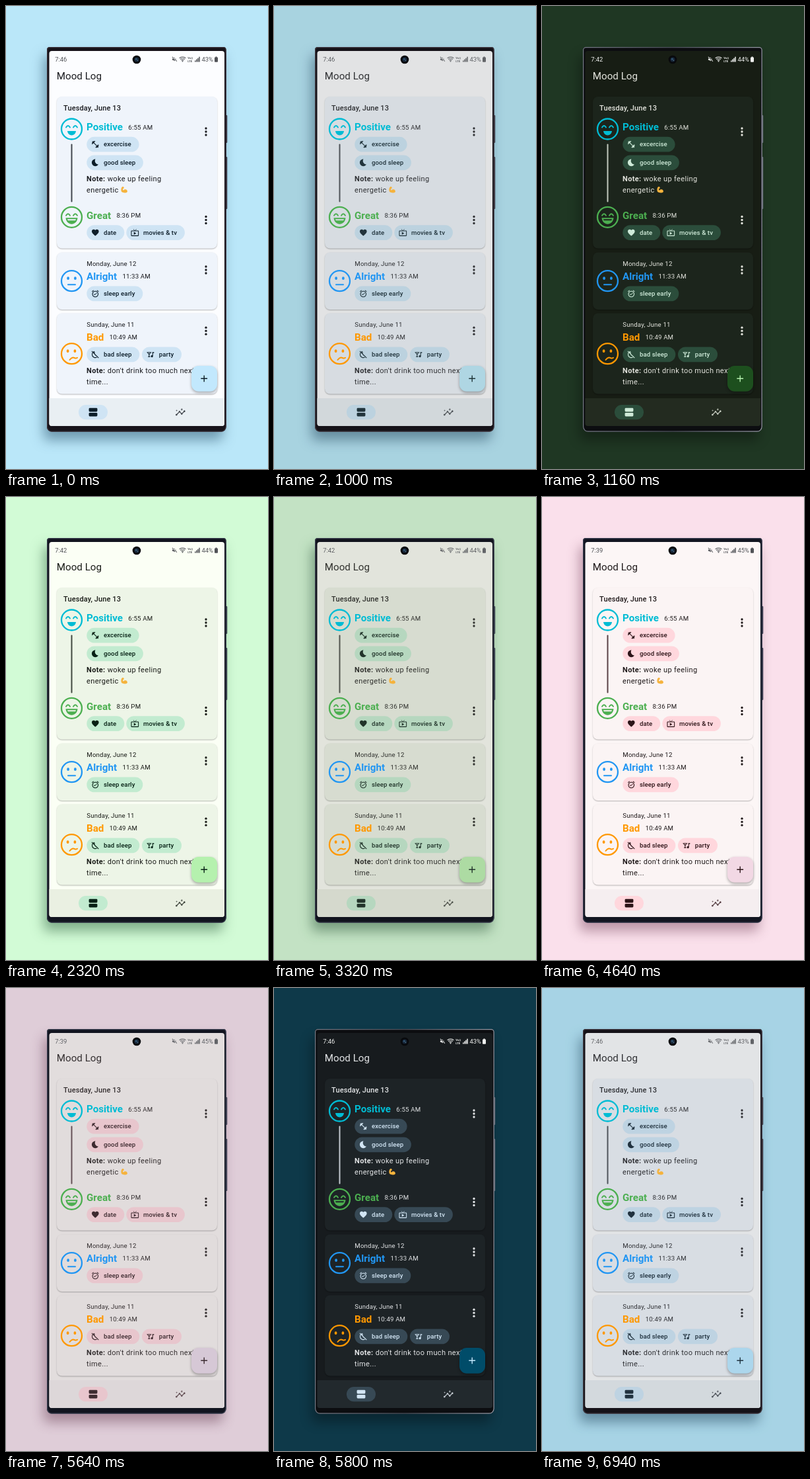
An HTML page with a canvas for the animation above (6.96 s loop, 397x700 px).

```html
<!DOCTYPE html>
<html lang="en">
<head>
<meta charset="utf-8">
<title>Mood Log themes</title>
<style>
html, body { margin: 0; width: 100%; height: 100%; overflow: hidden; }
canvas { display: block; width: 397px; height: 700px; }
</style>
</head>
<body>
<canvas id="stage"></canvas>
<script>
const W = 397, H = 700;
const HOLD = 1000, STEP = 20, STEPS = 9, SEGMENT = 1160;
const DP = 0.69; // pixels per layout unit of the phone screen
const dpr = window.devicePixelRatio || 1;

const themes = [
  { bg: '#bae7f9', screen: '#fcfdff', card: '#eff4fb', chip: '#cfe4f4', nav: '#e9eff3', fab: '#c2e8fd',
    text: '#1b1c20', ink: '#0c1d29', line: '#42474e', shade: 'rgba(40,80,105,.5)', body: '#17131a', edge: '#3b3038', time: '7:46', power: 43 },
  { dark: true, bg: '#1f3723', screen: '#171d14', card: '#1c251c', chip: '#2b4d3b', nav: '#232b20', fab: '#1d4f1e',
    text: '#e2e3dc', ink: '#ceead8', line: '#c2c9bd', fabInk: '#b5f1ae', time: '7:42', power: 44 },
  { bg: '#d2fbd6', screen: '#fbfff5', card: '#edf5e7', chip: '#c2ebd0', nav: '#eaf0e2', fab: '#b5f1ae',
    text: '#1a1c18', ink: '#062014', line: '#424940', shade: 'rgba(50,100,65,.5)', body: '#12141f', edge: '#343849', time: '7:42', power: 44 },
  { dark: true, bg: '#4f2638', screen: '#23181b', card: '#2b1f22', chip: '#5d3c41', nav: '#33262a', fab: '#73304f',
    text: '#ecdfe1', ink: '#ffd9df', line: '#d5c2c6', fabInk: '#ffd8e6', time: '7:39', power: 45 },
  { bg: '#fae0eb', screen: '#fcf6f6', card: '#fbf4f4', chip: '#ffd7dd', nav: '#f5eef0', fab: '#f2d8e4',
    text: '#201a1b', ink: '#2c1418', line: '#5a4247', shade: 'rgba(110,60,85,.45)', body: '#121521', edge: '#343a4c', time: '7:39', power: 45 },
  { dark: true, bg: '#0e3949', screen: '#171b1e', card: '#1d2326', chip: '#374955', nav: '#22292d', fab: '#004c69',
    text: '#e1e3e5', ink: '#d2e5f4', line: '#c1c7ce', fabInk: '#c2e8fd', time: '7:46', power: 43 }
];

// Icon outlines on a 24 unit grid
const icons = {
  dumbbell: 'M20.57 14.86L22 13.43 20.57 12 17 15.57 8.43 7 12 3.43 10.57 2 9.14 3.43 7.71 2 5.57 4.14 4.14 2.71 2.71 4.14l1.43 1.43L2 7.71l1.43 1.43L2 10.57 3.43 12 7 8.43 15.57 17 12 20.57 13.43 22l1.43-1.43L16.29 22l2.14-2.14 1.43 1.43 1.43-1.43-1.43-1.43L22 16.29z',
  moon: 'M12.34 2.02C6.59 1.82 2 6.42 2 12c0 5.52 4.48 10 10 10 3.71 0 6.93-2.02 8.66-5.02-7.51-.25-12.09-8.43-8.32-14.96z',
  heart: 'M12 21.35l-1.45-1.32C5.4 15.36 2 12.28 2 8.5 2 5.42 4.42 3 7.5 3c1.74 0 3.41.81 4.5 2.09C13.09 3.81 14.76 3 16.5 3 19.58 3 22 5.42 22 8.5c0 3.78-3.4 6.86-8.55 11.54z',
  tv: 'M21 6h-7.59l3.29-3.29L16 2l-4 4-4-4-.71.71L10.59 6H3c-1.1 0-2 .89-2 2v12c0 1.1.9 2 2 2h18c1.1 0 2-.9 2-2V8c0-1.11-.9-2-2-2zm0 14H3V8h18zM9 10v8l7-4z',
  alarm: 'M22 5.72l-4.6-3.86-1.29 1.53 4.6 3.86zM7.88 3.39L6.6 1.86 2 5.71l1.29 1.53zM12 4c-4.97 0-9 4.03-9 9s4.02 9 9 9 9-4.03 9-9-4.03-9-9-9zm0 16c-3.87 0-7-3.13-7-7s3.13-7 7-7 7 3.13 7 7-3.13 7-7 7zm-1.46-5.47L8.41 12.4l-1.06 1.06 3.18 3.18 6-6-1.06-1.06z',
  awake: 'M9.5 3.5C5 5 3 8.500 3 12a9 9 0 0 0 15 6.500M9.500 4c-.8 6 2 11 8 13M2 2.500L21.500 22',
  party: 'M1 5h14l-6 7v5h2v2H5v-2h2v-5zM10.1 9l1.4-2h-7l1.4 2zM17 5h5v3h-3v9a3 3 0 1 1-2-2.83z',
  chart: 'M21 8c-1.45 0-2.26 1.44-1.93 2.51l-3.55 3.56c-.3-.09-.74-.09-1.04 0l-2.55-2.55C12.27 10.45 11.46 9 10 9c-1.45 0-2.27 1.44-1.93 2.52l-4.56 4.55C2.44 15.74 1 16.55 1 18c0 1.1.9 2 2 2 1.45 0 2.26-1.44 1.93-2.51l4.55-4.56c.3.09.74.09 1.04 0l2.55 2.55C12.73 16.55 13.54 18 15 18c1.45 0 2.27-1.44 1.93-2.52l3.56-3.55C21.56 12.26 23 11.45 23 10c0-1.1-.9-2-2-2zM15 9l.94-2.07L18 6l-2.06-.93L15 3l-.92 2.07L12 6l2.08.93zM3.5 11L4 9l2-.5L4 8l-.5-2L3 8l-2 .5L3 9z',
  mute: 'M3 9v6h4l6 5V4L7 9zM16 8a5 5 0 0 1 0 8zM2 3l19 18 1.500-1.500L3.500 1.500z',
  arm: 'M3 5c1-3 5-4 7-2l1 4-4 2c0 3 1 4 2 5 3-4 9-4 12 0 3 5-1 8-6 8-6 0-12-1-13-5C1 13 1 9 3 5z'
};

let g; // context being drawn to

function makeCanvas(canvas) {
  canvas.width = Math.round(W * dpr);
  canvas.height = Math.round(H * dpr);
  const c = canvas.getContext('2d');
  c.scale(dpr, dpr);
  return c;
}

function box(x, y, w, h, r, fill) {
  g.beginPath();
  g.roundRect(x, y, w, h, r);
  g.fillStyle = fill;
  g.fill();
}

function shadow(color, dx, dy, blur, draw) {
  g.save();
  g.shadowColor = color;
  g.shadowOffsetX = dx * dpr;
  g.shadowOffsetY = dy * dpr;
  g.shadowBlur = blur * dpr;
  draw();
  g.restore();
}

function dot(x, y, r, fill, ry = r) {
  g.beginPath();
  g.ellipse(x, y, r, ry, 0, 0, 7);
  g.fillStyle = fill;
  g.fill();
}

function stroke(d, color, width) {
  g.strokeStyle = color;
  g.lineWidth = width;
  g.stroke(new Path2D(d));
}

function label(str, x, y, size, color, weight = 400, spacing = 0) {
  g.font = `${weight} ${size * DP}px Roboto, sans-serif`;
  g.letterSpacing = spacing * DP + 'px';
  g.fillStyle = color;
  g.fillText(str, x, y);
  return x + g.measureText(str).width;
}

function icon(name, cx, cy, size, color, outline) {
  g.save();
  g.translate(cx - size / 2, cy - size / 2);
  g.scale(size / 24, size / 24);
  if (outline) stroke(icons[name], color, 2);
  else {
    g.fillStyle = color;
    g.fill(new Path2D(icons[name]), 'evenodd');
  }
  g.restore();
}

function chip(t, x, y, w, name, str) {
  box(x, y, w, 22.8, 11.4, t.chip);
  icon(name, x + 13, y + 11.4, 12.8, t.ink, name === 'awake');
  label(str, x + 25.7, y + 14.6, 14, t.ink, 500, .1);
}

function face(y, color, mood) {
  g.save();
  g.translate(99.5, y);
  g.lineCap = 'round';
  g.strokeStyle = color;
  g.lineWidth = 2.3;
  g.beginPath();
  g.arc(0, 0, 15.5, 0, 7);
  g.stroke();
  g.fillStyle = color;
  if (mood === 'positive' || mood === 'great') {
    stroke('M-8.500 -2.500Q-5.500 -7.500 -2.500 -2.500M2.500 -2.500Q5.500 -7.500 8.500 -2.500', color, 1.9);
    if (mood === 'positive') g.fill(new Path2D('M-6.500 3H6.500C5.500 11.500 -5.500 11.500 -6.500 3z'));
    else {
      g.fill(new Path2D('M-9 1H9C8 13.500 -8 13.500 -9 1zM-6.500 3L-5.700 5H5.700L6.500 3z'), 'evenodd');
    }
  } else {
    const dx = mood === 'bad' ? -.5 : 0;
    dot(-5.4 + dx, -4, 1.9, color, 2.4);
    dot(5.4 + dx, -4, 1.9, color, 2.4);
    stroke(mood === 'bad' ? 'M-3 9.300Q1 4.200 4.500 6.500Q6.500 7.500 8.500 6' : 'M-5.500 5.500H5.500', color, 2);
  }
  g.restore();
}

function entry(t, name, color, y, clock) {
  const end = label(name, 122, y, 22, color, 700);
  label(clock, end + 8.3, y - 1.3, 14, t.text, 400, .25);
}

function menu(t, y) {
  for (const dy of [-5, 0, 5]) dot(303, y + dy, 1.65, t.text);
}

function card(t, y, h) {
  shadow(t.dark ? 'rgba(0,0,0,.3)' : 'rgba(0,0,0,.28)', 0, 1, 1.8, () => box(77, y, 243, h, 8, t.card));
}

function note(t, y, first, second) {
  const x = label('Note:', 122, y, 16, t.text, 700, .5);
  label(' ' + first, x, y, 16, t.text, 400, .5);
  return label(second, 122, y + 16.6, 16, t.text, 400, .5);
}

function phone(t) {
  const buttons = t.dark ? '#747987' : t.edge;
  box(332, 165, 3.2, 42, 1, buttons);
  box(332, 228, 3.2, 79, 1, buttons);
  const cast = t.dark ? 'rgba(0,0,0,.32)' : t.shade;
  const shell = [4, 4, 7, 7];
  shadow(cast, -5, 13, 18, () => box(62, 62, 271.500, 581.500, shell, t.body || '#0c0d10'));
  if (t.dark) {
    const rim = g.createLinearGradient(62, 0, 334, 0);
    rim.addColorStop(0, '#777b87');
    rim.addColorStop(.5, '#4b4f5a');
    rim.addColorStop(1, '#989ca8');
    g.strokeStyle = rim;
  } else g.strokeStyle = t.edge;
  g.lineWidth = 1.2;
  g.beginPath();
  g.roundRect(62.6, 62.6, 270.500, 580.500, shell);
  g.stroke();
  box(65.500, 68, 265.500, 567, 4, t.screen);
}

function statusBar(t) {
  const c = t.dark ? '#f1f2f1' : '#505257';
  label(t.time, 74.3, 84, 13.6, c);
  icon('mute', 255.3, 80.500, 9, c);
  g.lineCap = 'butt';
  for (const r of [2.8, 5, 7.2]) {
    g.beginPath();
    g.arc(267.500, 84.2, r, -2.32, -.82);
    g.strokeStyle = c;
    g.lineWidth = 1.1;
    g.stroke();
  }
  dot(267.500, 83.500, 1, c);
  label('Vo))', 275.200, 80, 6.2, c, 700);
  label('LTE', 275.200, 85, 6.2, c, 700);
  for (let i = 0; i < 4; i++) box(286 + i * 2.1, 82.500 - i * 1.9, 1.5, 2 + i * 1.9, 0, c);
  label(t.power + '%', 296.500, 84, 13.6, c);
  box(316, 77.500, 5, 7.3, 1, c);
  box(317.5, 76.500, 2, 1.5, .3, c);
  dot(198, 81, 6.3, '#08090c');
  dot(198, 81, 3.5, '#152538');
  dot(197.3, 80.200, 1.5, '#31536f');
  dot(199.4, 82.3, .7, '#607e92');
}

function screen(t) {
  statusBar(t);
  label('Mood Log', 76.8, 111, 22, t.text);

  card(t, 137, 229.500);
  label('Tuesday, June 13', 87, 158, 16, t.text, 500, .15);
  face(186, '#00bcd4', 'positive');
  entry(t, 'Positive', '#00bcd4', 188.3, '6:55 AM');
  menu(t, 190);
  chip(t, 122.3, 197.8, 79.3, 'dumbbell', 'excercise');
  chip(t, 122.3, 225.4, 85.600, 'moon', 'good sleep');
  const x = note(t, 265, 'woke up feeling', 'energetic ');
  icon('arm', x + 5.6, 277.8, 11, '#f5b33d');
  box(98.5, 208.500, 2, 88, 1, t.line);
  face(319.3, '#4caf50', 'great');
  entry(t, 'Great', '#4caf50', 321.500, '8:36 PM');
  menu(t, 323.5);
  chip(t, 122.3, 331.2, 57, 'heart', 'date');
  chip(t, 182.3, 331.2, 88.600, 'tv', 'movies & tv');

  card(t, 372.5, 86.500);
  label('Monday, June 12', 122.3, 393, 14, t.text, 400, .25);
  face(415.7, '#2196f3', 'alright');
  entry(t, 'Alright', '#2196f3', 413.500, '11:33 AM');
  menu(t, 399);
  chip(t, 122.3, 423.500, 85, 'alarm', 'sleep early');

  card(t, 464.500, 122);
  label('Sunday, June 11', 122.3, 485.200, 14, t.text, 400, .25);
  face(525.700, '#ff9800', 'bad');
  entry(t, 'Bad', '#ff9800', 505.700, '10:49 AM');
  menu(t, 491.2);
  chip(t, 122.3, 515.500, 80, 'awake', 'bad sleep');
  chip(t, 206, 515.500, 60, 'party', 'party');
  note(t, 555.3, "don't drink too much next", 'time...');

  box(65.500, 593, 265.500, 42, [0, 0, 4, 4], t.nav);
  box(110, 603, 44, 22.300, 11.1, t.chip);
  box(125.6, 607.8, 12.800, 5.6, 1.4, t.ink);
  box(125.6, 614.900, 12.800, 5.6, 1.4, t.ink);
  icon('chart', 264.300, 614, 16, t.line);

  shadow('rgba(0,0,0,.32)', 0, 2, 4, () => box(281, 544, 39, 38.700, 11, t.fab));
  g.lineCap = 'butt';
  stroke('M295.300 563.300H305.100M300.200 558.400V568.200', t.fabInk || t.ink, 1.4);
}

function render(t) {
  const canvas = document.createElement('canvas');
  g = makeCanvas(canvas);
  g.fillStyle = t.bg;
  g.fillRect(0, 0, W, H);
  phone(t);
  screen(t);
  return canvas;
}

const views = themes.map(render);
const out = makeCanvas(document.getElementById('stage'));
const start = performance.now();

function frame() {
  const time = (performance.now() - start) % (SEGMENT * views.length);
  const index = Math.floor(time / SEGMENT);
  const fade = time - index * SEGMENT - HOLD;
  out.globalAlpha = 1;
  out.drawImage(views[index], 0, 0, W, H);
  if (fade >= 0) {
    out.globalAlpha = (Math.floor(fade / STEP) + 1) / STEPS;
    out.drawImage(views[(index + 1) % views.length], 0, 0, W, H);
  }
  requestAnimationFrame(frame);
}
frame();
</script>
</body>
</html>
```
